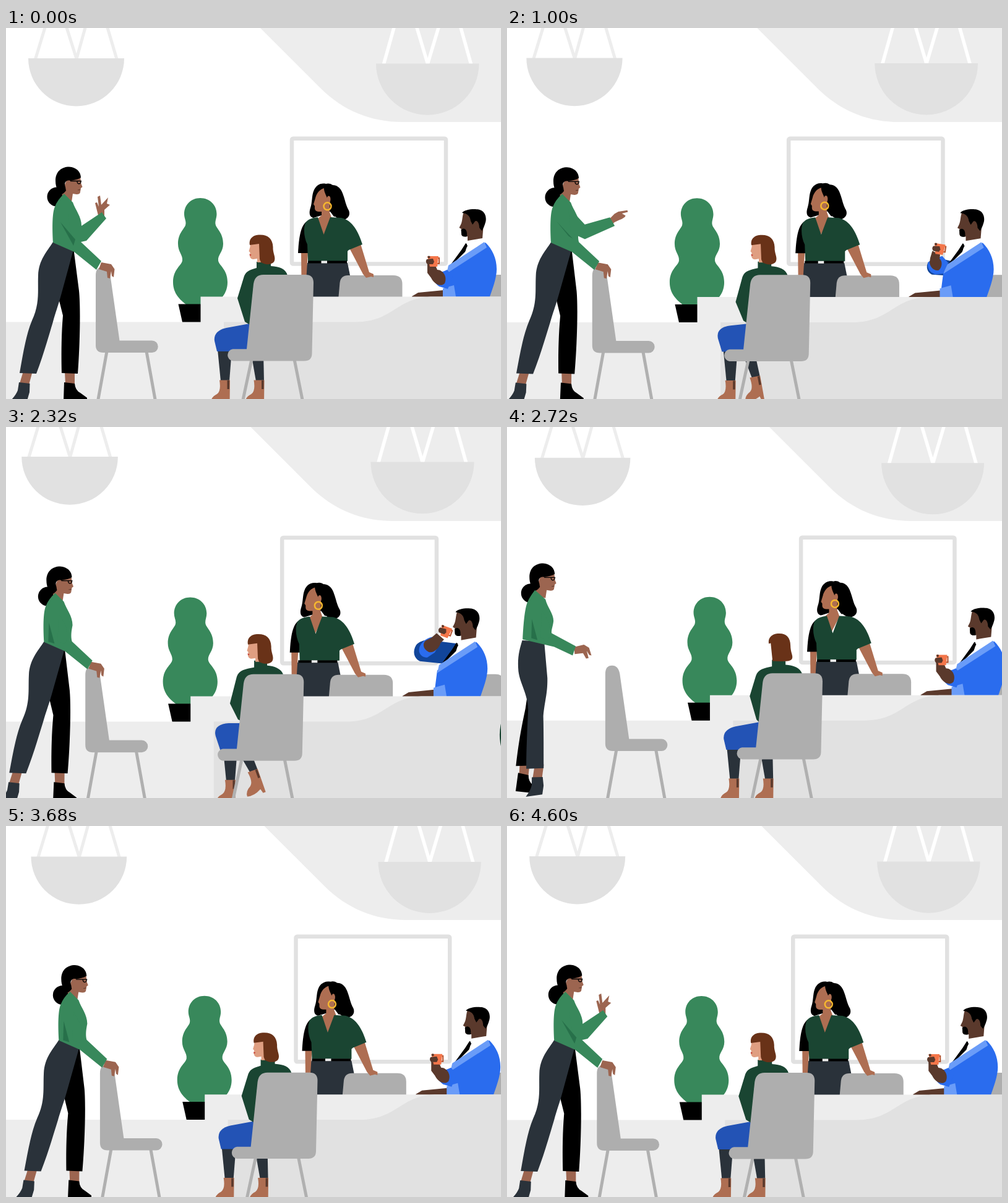
Recreate the animation shown at these times as an HTML page. Size 800 px wide and 600 px high, loop 4.64 s.

```html
<!DOCTYPE html>
<html lang="en">
<head>
<meta charset="utf-8">
<title>Meeting room</title>
<style>
html, body { margin: 0; width: 100%; height: 100%; overflow: hidden; background: #fff; }
svg { display: block; width: 100vw; height: 100vh; }
.pale { fill: #ededed; } .mid { fill: #e1e1e1; } .seat { fill: #aeaeae; }
.leg { stroke: #b0b0b0; stroke-width: 5; fill: none; }
.green { fill: #38885b; } .forest { fill: #1a4532; } .slate { fill: #2a323a; }
.blue { fill: #2a6cee; } .sky { fill: #6a9cf8; } .navy { fill: #11459a; }
.tan { fill: #ae6e52; } .brown { fill: #9c6550; } .dark { fill: #5a392c; }
</style>
</head>
<body>
<svg viewBox="0 0 800 600">
  <g class="cam"><path class="pale" d="M411 0L508 97C545 134 590 152 640 152H860V-10H401Z"/></g>
  <g id="lamps" fill="none">
    <path stroke="#ededed" stroke-width="5" d="M47 52L64 -4M97 -4L114 50L129 -4M179.500 52L163 -4"/>
    <path stroke="#fff" stroke-width="5.500" d="M610 60L628 -4M663 -4L681.500 58L700 -4M752 60L734 -4"/>
    <path class="mid" d="M36 49H191A77.500 77.500 0 0 1 36 49ZM598 57.500H764.500A83.200 83.200 0 0 1 598 57.500Z"/>
  </g>
  <g class="cam">
    <rect x="462" y="178.800" width="249" height="202.700" rx="2" fill="#fff" stroke="#e1e1e1" stroke-width="6.500"/>
    <path class="pale" d="M-40 475.500H860V620H-40Z"/>
    <path class="green" d="M314 275C329 275 340.500 286 340.500 301C340.500 308 337 313 339 319C341 325 351 332 351 349C351 362 342 367 343 376C344 384 358 390 358 411C358 430 346 440 337 447H291C282 440 270 430 270 411C270 390 284 384 285 376C286 367 278 362 278 349C278 332 288 325 290 319C292 313 288 308 288 301C288 286 299 275 314 275Z"/>
    <path d="M278.500 446.500H340V475.500H285Z"/>

    <!-- standing colleague -->
    <path class="slate" d="M487 380H552L557 405V440H482V400Z"/>
    <path class="tan" d="M477 362H488L485 410H477.500Z"/>
    <path class="seat" d="M537 440L539.500 412Q541 400 553 400H626Q640.500 400 640.500 414V440Z"/>
    <g id="leadHead">
      <path d="M517 252C508 250 500 255 497 264C494 272 495 282 492 291C489 300 491 306 497 307L510 303L526 296C530 305 537 310 545 310C553 309 557 302 554 295C549 286 548 278 545 270C542 260 536 254 528 254C524 251 520 251 517 252Z"/>
      <path class="tan" d="M514 259C507 261 502 267 500 275L497 285L499 288V292Q499.500 296.500 505 297L510 297V303L503 309L513 336L527 309L523 298L524 272L518 260Z"/>
      <path d="M514 256C513 264 517 269 519 275L523 272L526 285L524 297L530 305L543 304L540 262L526 254Z"/>
      <ellipse class="tan" cx="521.500" cy="277" rx="3" ry="5.500"/>
      <circle cx="519.500" cy="288.300" r="6" fill="none" stroke="#f6b72f" stroke-width="2.500"/>
    </g>
    <g id="leadTop">
      <path d="M486 313C475 320 473 345 472 364H488V340Z"/>
      <path class="tan" d="M555 356L573 349L587 395L594 398L594 403L590 402L582 404L577 398Z"/>
      <path class="forest" d="M504 306L513.500 334L524 306L542 307C560 311 570 330 576 350L554 359L552 361V377H488L487 350C482 340 480 325 484 315C488 309 495 307 504 306Z"/>
    </g>
    <path d="M488 376.500H551V380.500H488Z"/>
    <path fill="#eee" d="M509.500 376.500H519V380.500H509.500Z"/>

    <!-- colleague with the cup -->
    <path class="seat" d="M774 440L780 412Q782 399 795 399H806Q820 399 820 413V440Z"/>
    <path class="navy" id="cuffBack"/>
    <path d="M743 348L747 351L742 362L724 380L717 385L736 359Z"/>
    <path fill="#fff" d="M746 344L769 339L776 348L742 366Z"/>
    <path d="M743 349L746 352L741 362L737 360Z"/>
    <path class="dark" d="M656 434L666 428L707 424V436H656Z"/>
    <path class="blue" d="M775 347C786 358 793 372 793 390C793 405 786 422 780 440H706L712 393Z"/>
    <path class="sky" d="M773 346L777 355L712 397L715 384ZM706 421L724 416L728 440H706Z"/>
    <path class="blue" id="sleeve"/>
    <g id="guestHead">
      <path class="dark" d="M740 297C737 305 738 312 735 318L732.500 323L736 325V334Q737 338 746 337V344L770 340L772 315L765 299Z"/>
      <path d="M737 299C741 293 756 292 764 293.500C775 296 777 307 775 314C773 321 771 325 769 328L765 323C765 314 760 309 757 314L754 318L751 312C750 304 746 300 737 299ZM735.500 326C741 322 745 326 745 333V337Q737 339 736 333Z"/>
    </g>
    <path class="dark" id="forearm"/>
    <g id="cup">
      <path fill="none" stroke="#b4512c" stroke-width="2" d="M698 372H700V381H697"/>
      <path fill="#f4764a" d="M681 369H699L697 386H685Z"/>
      <path class="dark" d="M680 374L690 373L692 378L690 382L681 382Q677 378 680 374Z"/>
      <circle class="dark" cx="683.500" cy="370.500" r="2"/>
    </g>

    <!-- table -->
    <path class="pale" d="M314.500 434.500H860V620H314.500Z"/>
    <path class="mid" d="M352 475.500H565C628 475 630 434.500 692 434.500H860V620H352Z"/>

    <!-- seated colleague -->
    <g id="farLeg">
      <path class="slate" d="M396 525H416L417 571H404Z"/>
      <path class="tan boot" transform="translate(55.500 0)"/>
      <path class="dark" d="M413 570H416.500V584H413Z"/>
    </g>
    <g id="nearLeg">
      <path class="slate" d="M342 520H365L361 571H347Z"/>
      <path class="tan boot"/>
      <path class="dark" d="M357.500 570H361V584H357.500Z"/>
    </g>
    <path fill="#2353b5" id="lap"/>
    <path class="forest" id="jumper"/>
    <g id="sitHead">
      <g id="sitFace">
        <path fill="#df9e81" d="M395 346L394.500 354L392.500 361L394.500 363L394 369Q395 374 400 374L406 373V379H418V346Z"/>
        <path fill="#c2382f" d="M393.500 365.500L397 367L394 368.500Z"/>
      </g>
      <path fill="#693218" id="sitHair"/>
    </g>
    <path class="leg" d="M397 536L382 606M466 536L480 606"/>
    <path class="seat" d="M400 414Q402 399 416 399H484Q497 399 497 412L494.500 527Q494 538.500 482 538.500H366.500A9.700 9.700 0 0 1 366.500 519.300H389Z"/>

    <!-- empty chair -->
    <path class="leg" d="M163 523L148 606M227 523L242 606"/>
    <path class="seat" d="M145 400Q145 386.500 156 386.500Q166 386.500 168.500 400L183.500 505.500H236A9.700 9.700 0 0 1 236 525H157Q145 525 145 513Z"/>

    <!-- colleague by the chair -->
    <g id="walker">
      <g id="legs">
        <g id="swingB">
          <g id="footB">
            <path class="brown" d="M95 555H111V577H96Z"/>
            <path d="M94 573L111 575Q112 586 120 590L131 598V603H93Z"/>
          </g>
          <path id="legB"/>
        </g>
        <g id="swingA">
          <g id="footA">
            <path class="brown" d="M28 555H43L37 577L22 575Z"/>
            <path class="slate" d="M21 573L38.500 575L38 589L34 603H7Q16 594 19 586Z"/>
          </g>
          <path class="slate" id="legA"/>
        </g>
      </g>
      <path class="brown" id="hand"/>
      <g id="rest">
        <path class="brown" d="M154 379L170 382L175.500 390L174 403L171 401L170 393L168 405L164 404L163 394L150 390Z"/>
      </g>
      <g id="head">
        <circle cx="82" cy="273" r="15.500"/>
        <path class="brown" d="M98 246L120 240L121.500 252L123.500 257L121 259L120 265Q120 269 114 269L108 268L106 281L92 278L90 266Z"/>
        <path d="M80 247C80 232 90 224.500 102 224.500C114 225 121 233 121 242C116 245 110 246 104 247C98 245 93 250 96 257L97 263C93 268 90 270 88 268C82 262 80 255 80 247Z"/>
        <path stroke="#000" stroke-width="1.300" fill="none" d="M104 247.500H122M115 247.500Q115 252 118 252Q121 252 121 247.500"/>
        <path stroke="#5a392c" fill="none" d="M116 262L120 261.500"/>
      </g>
      <path class="green" id="shirt"/>
      <path class="green" id="arm"/>
      <path fill="#27704a" id="fold"/>
    </g>
  </g>
  <circle id="passer" class="forest" cy="498" r="77"/>
</svg>
<script>
const LOOP = 4640, CUT = 2360;
const $ = id => document.getElementById(id);
const NUM = /-?\d+(\.\d+)?/g;

// Blend two strings that share the same layout of numbers.
function mix(a, b, k) {
  const to = b.match(NUM);
  let i = 0;
  return a.replace(NUM, n => +(+n + (to[i++] - n) * k).toFixed(3));
}
function shift(d, dx, dy) {
  let i = 0;
  return d.replace(NUM, n => +n + (i++ % 2 ? dy : dx));
}
function sample(keys, t) {
  const i = keys.findIndex(k => k[0] > t);
  if (i < 0) return keys[keys.length - 1][1];
  if (!i) return keys[0][1];
  const [t0, a] = keys[i - 1], [t1, b] = keys[i];
  const k = (t - t0) / (t1 - t0);
  return a === b ? a : mix(a, b, k * k * (3 - 2 * k));
}
const place = (x, y, r = 0, cx = 0, cy = 0) => `translate(${x} ${y})rotate(${r} ${cx} ${cy})`;

const tracks = [];
const track = (id, attr, ...keys) => tracks.push([$(id), attr, keys]);

// Arrival after the cut, then leaning on the chair.
const arrive = (id, attr, far, near) =>
  track(id, attr, [CUT - 1, near], [CUT, far], [3120, far], [3580, near]);
// Small forward sway while pointing, with its own pose on arrival.
const sway = (id, back, front, far) =>
  track(id, 'transform', [0, back], [500, front], [CUT - 1, front], [CUT, far],
    [3120, far], [3580, front], [3800, front], [4400, back]);
// Sip from the cup; lowered again at the cut.
const sip = (id, attr, low, high) =>
  track(id, attr, [0, low], [450, mix(low, high, .12)], [760, mix(low, high, .12)],
    [1360, high], [CUT - 1, high], [CUT, low]);
// Shift on the seat, back upright at the cut.
const cross = (id, attr, a, b, c = b) =>
  track(id, attr, [600, a], [1300, b], [1480, b], [2200, c], [CUT - 1, c], [CUT, a]);
// Lean that lasts until the head turns back.
const lean = (id, attr, a, b, turned = b) =>
  track(id, attr, [600, a], [1300, b], [CUT - 1, b], [CUT, turned], [3140, turned], [3560, a]);

arrive('shirt', 'd',
  'M67 270L84 285C87 298 97 308 97 320C96 329 93 335 94 340L133 361L128 376L98 362L47 350C48 330 50 300 55 289Q59 280 67 270Z',
  'M94 268L108 282C112 294 122 305 122 320C120 330 119 338 121 346L154 377L146 391L110 362L76 347C75 330 74 300 79 289Q83 278 94 268Z');
arrive('legA', 'd',
  'M47 349L82 356L79 415C76 440 70 450 64 475C60 510 56 535 53 559L25 556C29 525 36 490 41 462C44 435 34 420 34 398C35 375 41 362 47 349Z',
  'M76 346L110 355L89 432C84 450 80 460 76 475C67 505 60 530 49 559L22 558C27 530 32 497 42 473C55 445 51 425 52 400C53 375 66 362 76 346Z');
arrive('legB', 'd',
  'M82 356L98 435C102 455 103 520 103 554L78 560C74 520 74 490 74 465L73 450C70 410 72 380 82 356Z',
  'M109 355L118 425C121 455 119 520 116 559L90 558C89 520 90 490 92 465L85 437C90 410 100 380 109 355Z');
arrive('footA', 'transform', place(11, -2), place(0, 0));
arrive('footB', 'transform', place(-10, -3, -6, 95, 575), place(0, 0, 0, 95, 575));
arrive('rest', 'transform', place(-21, -17, -24, 153, 385), place(0, 0, 0, 153, 385));
sway('shirt', place(0, 0), place(2.4, 0), place(0, 0));
sway('legs', 'translate(0 0)skewX(0)', 'translate(6 0)skewX(-0.57)', 'translate(0 0)skewX(0)');
for (const id of ['head', 'hand', 'arm', 'fold'])
  sway(id, place(0, 0), place(2.3, .7), place(-22, 2));

const armUp = 'M100 300L122 320L155 298L162 308L130 344L108 349Z';
const armOut = 'M104 286L133 315L175 303L183 317L134 338L110 327Z';
const armBent = 'M102 299L116 329L147 320L154 332L111 356L96 349Z';
const armIn = 'M100 300L112 322L113 338L112 345L109 350L98 345Z';
const handUp = 'M149 303L144 283L147 282L150 289L148 273L152 271L154 286L165 274L163 284L168 286L159 294L159 304Z';
const handOut = 'M175 305L184 298L191 295L207 293L207 296L195 298L202 301L201 304L196 308L190 310L182 312L179 314Z';
const handBent = 'M146 322L145 309L146 303L151 300L158 301L163 306L162 312L159 310L157 307L155 310L156 321L155 329Z';
const handIn = shift(handBent, -50, 12);
const foldLow = 'M84 315L93 349L83 346Z';
const gesture = (id, up, out, bent, hid) => track(id, 'd', [0, up], [480, out], [880, out],
  [1400, bent], [1500, bent], [2050, hid], [3780, hid], [4400, up]);
gesture('arm', armUp, armOut, armBent, armIn);
gesture('hand', handUp, handOut, handBent, handIn);
gesture('fold', 'M88 314L112 342L109 352Z', 'M86 312L114 338L108 334Z', foldLow, foldLow);

lean('jumper', 'd',
  'M405 378L428 378L428 385C442 386 452 389 455 400L455 420L400 420L394 480L386 475L374 437L385 401C389 392 396 391 405 388Z',
  'M417 377L438 377L438 385C450 386 461 390 464 400L464 420L405 420L395 474L391 472L378 446L389 403C393 392 402 391 417 388Z',
  'M415 377L437 377L437 385C450 386 461 390 464 400L464 420L405 420L395 479L390 474L379 436L389 403C393 392 402 391 415 388Z');
lean('sitHead', 'transform', place(0, 0), place(13, 0), place(14, 0));
const bob = 'M394 351C392 340 400 334.5 410 334.5C423 334 431 341 431.5 354C431 364 436 370 434 376C432 383 420 384 412 379L410 374L409 349Z';
lean('sitHair', 'd', bob, bob,
  'M396 351C394 340 403 334.5 412 334.5C424 334 431 341 431 354C431 364 435 370 434 374C433 379 426 379.5 414 379.5L402 379L399 350Z');
lean('sitFace', 'transform', place(0, 0), place(0, 0), place(11, 0));
cross('lap', 'd', 'M394 478L356 485Q335 490 337 506L341 523L394 523Z', 'M394 478L376 478Q350 480 355 499L363 523L394 523Z');
cross('nearLeg', 'transform', place(0, 0), place(24, 0), place(25, 0));
cross('farLeg', 'transform', place(0, 0, 0, 406, 535), place(-13, -8, -18, 406, 535), place(-6, -12, -20, 406, 535));

sip('cuffBack', 'd', 'M712 394L720 400L716 414L700 414C694 411 692 404 694 399C700 396 706 395 712 394Z',
  'M700 344L748 350L722 382L684 378C674 373 672 362 678 352C683 346 692 343 700 344Z');
sip('sleeve', 'd', 'M713 391L722 402L714 422L700 418C691 411 688 404 690 397C696 396 706 395 713 391Z',
  'M706 339L716 350L708 364L696 372C686 372 680 364 684 354C688 346 697 339 706 339Z');
sip('forearm', 'd', 'M681 381L694 384L697 391C706 391 714 402 709 413C702 420 691 413 687 404L681 396Z',
  'M711 333L723 343L717 349C716 356 706 366 698 363C689 358 688 350 693 345L703 340Z');
sip('cup', 'transform', place(0, 0, 0, 690, 377), place(35, -47, 20, 690, 377));
sip('guestHead', 'transform', place(0, 0), place(4.5, 0));
track('leadHead', 'transform', [700, place(0, 0)], [1400, place(1.5, -2)], [1600, place(1.5, -2)], [2200, place(1, 0)],
  [CUT - 1, place(1, 0)], [CUT, place(-2.5, -2)], [3120, place(-2.5, -2)], [3600, place(1, 0)], [4400, place(0, 0)]);
track('leadTop', 'transform', [700, place(0, 0)], [1400, place(2.5, 0)], [CUT - 1, place(2.5, 0)], [CUT, place(0, 0)]);

for (const boot of document.querySelectorAll('.boot'))
  boot.setAttribute('d', 'M345 569.500H362L361.500 609H357L355 602Q342 609 331 606Q331 597 341 592Q348 587 345 569.500Z');

const cams = document.querySelectorAll('.cam');
function draw(t) {
  const p = (t < CUT ? t : t - LOOP) / 2320;
  for (const c of cams)
    c.setAttribute('transform', `translate(${-17.2 * p} ${-.4 * p})scale(${1 + .003 * p})`);
  $('lamps').setAttribute('transform', `translate(${-10.9 * p} ${-1.2 * p})scale(${1 + .0039 * p})`);
  for (const [el, attr, keys] of tracks) el.setAttribute(attr, sample(keys, t));

  const left = t >= CUT && t < 3120 ? 3120 - t : 0;
  const step = Math.sin(left / 900 * Math.PI);
  $('walker').setAttribute('transform', place(-.09 * left, -6 * step));
  $('swingA').setAttribute('transform', place(0, 0, -8 * step, 65, 355));
  $('swingB').setAttribute('transform', place(0, 0, 12 * step, 80, 355));
  $('passer').setAttribute('cx', t > 2200 && t < CUT ? 875 + (2320 - t) * .15 : 1000);
}
const start = performance.now();
function tick() {
  draw((performance.now() - start) % LOOP);
  requestAnimationFrame(tick);
}
tick();
</script>
</body>
</html>
```
